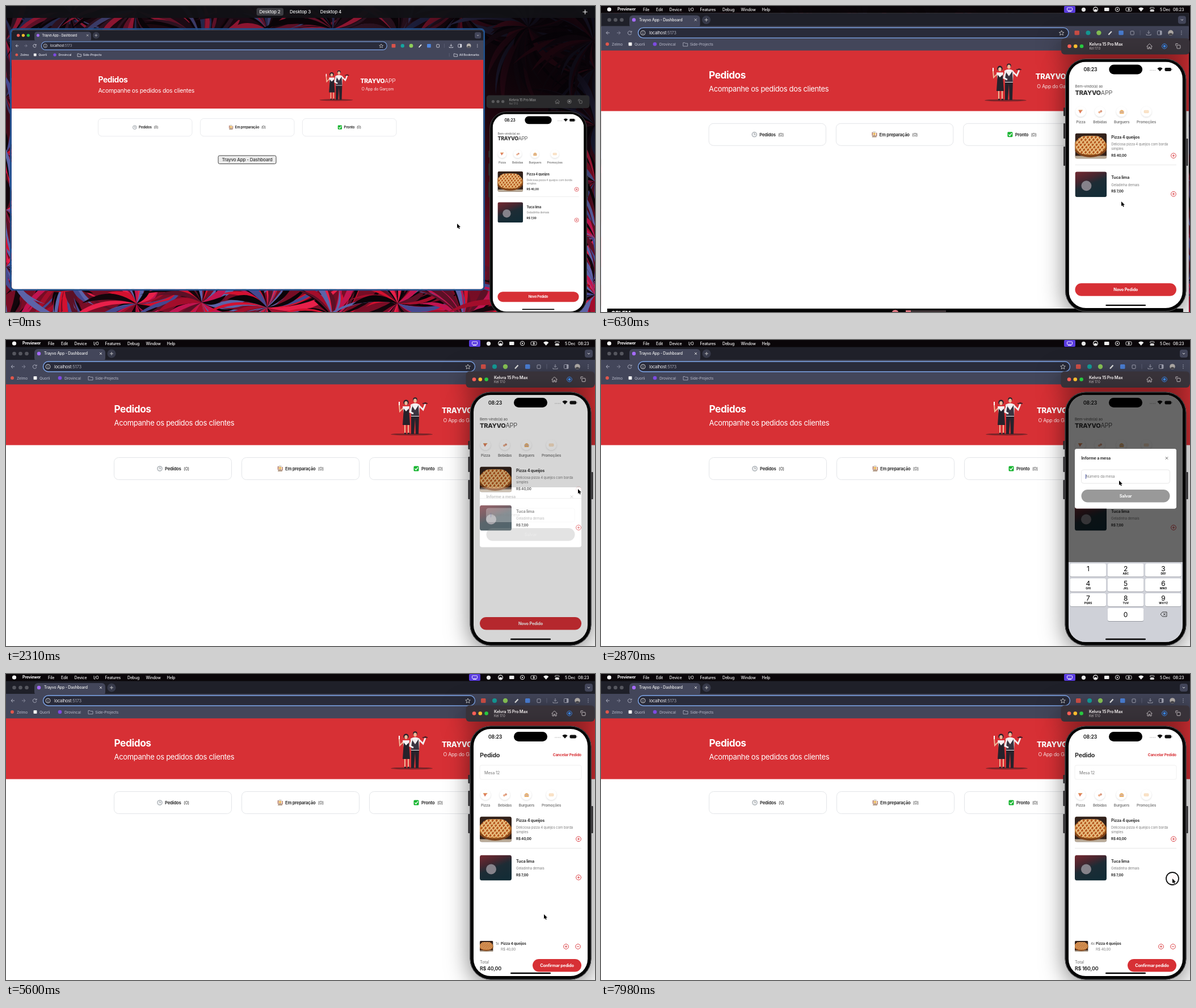
An HTML page with a canvas for the animation above (8000 ms loop, 1038 by 540 pixels).

```html
<!DOCTYPE html>
<html lang="pt-BR">
<head>
<meta charset="utf-8">
<title>Pedidos</title>
<style>
  html, body { margin: 0; width: 100%; height: 100%; overflow: hidden; background: #000; }
  canvas { display: block; width: 100vw; height: 100vh; }
</style>
</head>
<body>
<canvas id="stage"></canvas>
<script>
const W = 1038, H = 540, LOOP = 8000, STEP = 70;
const RED = '#d73035', INK = '#333', GRAY = '#808080';
const FONT = 'Inter, "Noto Sans", sans-serif';
const canvas = document.getElementById('stage');
const dpr = window.devicePixelRatio || 1;
canvas.width = W * dpr;
canvas.height = H * dpr;
let ctx = canvas.getContext('2d');

const clamp = v => Math.max(0, Math.min(1, v));
const easeOut = v => 1 - (1 - clamp(v)) ** 3;
const during = (t, start, length) => t >= start && t < start + length;

// Drawing helpers
function paint(shape, fill, stroke, width = 1) {
  if (fill) { ctx.fillStyle = fill; ctx.fill(shape); }
  if (stroke) { ctx.strokeStyle = stroke; ctx.lineWidth = width; ctx.stroke(shape); }
}
function box(x, y, w, h, r, fill, stroke, width) {
  const shape = new Path2D();
  shape.roundRect(x, y, w, h, r);
  paint(shape, fill, stroke, width);
}
function oval(x, y, rx, ry, fill, stroke, width) {
  const shape = new Path2D();
  shape.ellipse(x, y, rx, ry, 0, 0, 7);
  paint(shape, fill, stroke, width);
}
const dot = (x, y, r, fill, stroke, width) => oval(x, y, r, r, fill, stroke, width);
const line = (d, stroke, width) => paint(new Path2D(d), null, stroke, width);
const solid = (d, fill) => paint(new Path2D(d), fill);

// y is the middle of the capital letters
function text(str, x, y, size, weight = 400, color = INK, align = 'left') {
  ctx.font = `${weight} ${size}px ${FONT}`;
  ctx.letterSpacing = `${-0.025 * size}px`;
  ctx.textAlign = align;
  ctx.fillStyle = color;
  ctx.fillText(str, x, y + size * 0.36);
  return ctx.measureText(str).width;
}
function brand(x, y, size, color) {
  const w = text('TRAYVO', x, y, size, 800, color);
  text('APP', x + w, y, size, 300, color);
}
function inside(x, y, w, h, r, draw) {
  ctx.save();
  ctx.beginPath();
  ctx.roundRect(x, y, w, h, r);
  ctx.clip();
  draw();
  ctx.restore();
}
function faded(alpha, draw) {
  ctx.save();
  ctx.globalAlpha *= alpha;
  draw();
  ctx.restore();
}
function placed(scale, x, y, draw) {
  ctx.save();
  ctx.translate(x, y);
  ctx.scale(scale, scale);
  draw();
  ctx.restore();
}

// Palm-like wallpaper, drawn once
const wallpaper = (() => {
  const layer = document.createElement('canvas');
  layer.width = W;
  layer.height = H;
  const screen = ctx;
  ctx = layer.getContext('2d');
  let seed = 11;
  const rnd = () => (seed = (seed * 16807) % 2147483647) / 2147483647;
  const dim = ['#5c1026', '#8c1530', '#23264a', '#3a3a66', '#0a0408', '#0a0408', '#1b0a14', '#2c1220'];
  const vivid = ['#d3112f', '#e8204a', '#a30d2b', '#c01450', '#45488f', '#5c63a8', '#0a0408', '#14060c', '#5c1026'];
  const ground = ctx.createLinearGradient(0, 0, 0, H);
  ground.addColorStop(0, '#14070e');
  ground.addColorStop(1, '#7c0d26');
  ctx.fillStyle = ground;
  ctx.fillRect(0, 0, W, H);
  function fan(cx, cy, colors, leaves) {
    for (let i = 0; i < leaves; i++) {
      const a = rnd() * 6.28, reach = 40 + rnd() * 110, wide = 3 + rnd() * 9;
      const dx = Math.cos(a), dy = Math.sin(a);
      const bend = reach * 0.25, mx = cx + dx * reach / 2 - dy * bend, my = cy + dy * reach / 2 + dx * bend;
      const x = cx + dx * reach, y = cy + dy * reach;
      solid(`M${cx} ${cy}Q${mx - dy * wide} ${my + dx * wide} ${x} ${y}Q${mx + dy * wide} ${my - dx * wide} ${cx} ${cy}`,
        colors[Math.floor(rnd() * colors.length)]);
    }
  }
  for (let i = 0; i < 10; i++) {
    fan(i * 115, rnd() * 70, dim, 45);
    fan(i * 115, 470 + rnd() * 90, vivid, 55);
    fan(i % 2 * W, 60 + i * 50, i < 4 ? dim : vivid, 40);
  }
  const shade = ctx.createRadialGradient(960, 80, 60, 960, 80, 330);
  shade.addColorStop(0, 'rgba(5,2,6,.85)');
  shade.addColorStop(1, 'rgba(5,2,6,0)');
  ctx.fillStyle = shade;
  ctx.fillRect(0, 0, W, H);
  ctx = screen;
  return layer;
})();

function servers() {
  oval(715, 166.5, 37, 2, '#7d2429');
  line('M703 147V165M709 147V165', '#f0b797', 2);
  line('M702 165h3M708 165h3', '#26222b', 2.5);
  dot(705, 110, 4.6, '#26222b');
  oval(705, 111.5, 2.8, 3.4, '#f0b797');
  line('M701 119L694 126L693 115', '#f0b797', 2);
  line('M693 115V109', '#fff', 2);
  solid('M699 117L711 117L710 130H701Z', '#f4eff0');
  solid('M701 121L705 126L710 121L712 150H699Z', '#26222b');
  solid('M714 132H728L727 166H722L721 138L719 166H714Z', '#26222b');
  solid('M713 114Q721 109 729 114L728 135H714Z', '#f4eff0');
  solid('M715 115L721 124L727 115L728 134H714Z', '#3a3440');
  line('M715 116L712 127L718 130M728 116L735 123L739 113', '#f4eff0', 2.8);
  line('M734 112H743', '#26222b', 1.4);
  solid('M736 111.5a3.5 3.5 0 0 1 6 0z', '#5b1a20');
  dot(721, 105, 3.7, '#26222b');
  oval(721, 107, 2.8, 3.6, '#f0b797');
}

function browser(active) {
  const glyph = active ? '#e4e5ee' : '#a8aaba', bar = '#43465a';
  const lights = active ? ['#ff5f57', '#febc2e', '#28c840'] : Array(3).fill('#55565e');
  box(0, 12, W + 1, 572, active ? 6 : 0, '#fff');
  box(0, 12, W + 1, 24, active ? [6, 6, 0, 0] : 0, '#1f2029');
  lights.forEach((c, i) => dot(14.5 + i * 11, 24, 3.3, c));
  box(50, 16, 125, 22, 6, bar);
  dot(58, 24, 3.2, '#a66bff');
  text('Trayvo App - Dashboard', 67, 23.7, 6.9, 500, '#eee');
  line('M165 22l4 4m0 -4l-4 4', '#ddd', 0.9);
  dot(186, 24, 7.5, '#373a4a');
  line('M183 24h6m-3 -3v6', '#ccc', 0.9);
  box(1020, 17, 14, 14, 4, bar);
  line('M1025 23l2 2l2 -2', '#ddd', 1);

  ctx.fillStyle = bar;
  ctx.fillRect(0, 35, W + 1, 44);
  line('M15 47H9l3 -3m-3 3l3 3', glyph, 1);
  line('M28 47h6l-3 -3m3 3l-3 3', '#85879a', 1);
  line('M53.5 45.5a3.3 3.3 0 1 0 .3 2.5M54 43.5v2.4h-2.4', glyph, 1);
  box(65.5, 38, 761, 18, 9, '#292b3a', '#80a9ee', 1.4);
  dot(74, 47, 4, null, '#ddd', 0.9);
  line('M74 46.5v3M74 44.5v1', '#ddd', 0.9);
  const hostWidth = text('localhost', 85, 47, 7.5, 400, '#f2f2f6');
  text(':5173', 85 + hostWidth, 47, 7.5, 400, '#a5a7b5');
  line('M814 43l1.3 2.8l3 .3l-2.3 2l.8 3l-2.8 -1.6l-2.8 1.6l.8 -3l-2.3 -2l3 -.3z', '#ddd', 0.8);
  box(837, 43, 8.5, 8, 1.5, '#d9534a');
  dot(861, 47, 4, '#15a5a0');
  dot(880, 47, 4.2, '#8fcf5a');
  line('M897 50.5l5.5 -6', '#eee', 2.2);
  box(915, 43, 8.5, 8, 1.5, '#4f86e0');
  box(936, 44, 6, 6.5, 1, null, glyph, 1);
  line('M953 42.5v9', '#62657a', 1);
  line('M968 43v5m-2.3 -2l2.3 2.3l2.3 -2.3M964 49v2h8v-2', glyph, 1);
  box(983.5, 43.5, 7.5, 7, 1, null, glyph, 1);
  solid('M988 43.5h3v7h-3z', glyph);
  dot(1007, 47, 4.8, '#b9b4b0');
  solid('M1003 50q4 -5 8 0q-4 3 -8 0', '#4b4a50');
  [44, 47, 50].forEach(y => dot(1026, y, 0.8, glyph));

  dot(11, 67, 3, '#e0574c');
  text('Zelmo', 19, 67.2, 6.7, 500, glyph);
  box(48.5, 64, 6, 6, 1, '#f0f0f0');
  text('Quorli', 59, 67.2, 6.7, 500, glyph);
  dot(95, 67, 3.3, '#7d4be0');
  text('Drovincal', 103, 67.2, 6.7, 500, glyph);
  const folder = x => line(`M${x} 64.5h3l1 1.2h4v5h-8z`, glyph, 0.9);
  folder(145);
  text('Side-Projects', 157, 67.2, 6.7, 500, glyph);
  line('M964 63v8', '#62657a', 1);
  folder(974);
  text('All Bookmarks', 986, 67.2, 6.7, 500, glyph);

  ctx.fillStyle = RED;
  ctx.fillRect(0, 78.3, W + 1, 107.2);
  text('Pedidos', 190.5, 122, 17.3, 700, '#fff');
  text('Acompanhe os pedidos dos clientes', 190.5, 146, 13, 400, '#fff');
  servers();
  brand(768, 124.5, 13, '#fff');
  text('O App do Garçom', 770.5, 142, 8.8, 400, '#fbe5e5');

  const columns = [['Pedidos', 190.5, 89.5], ['Em preparação', 415.5, 76.5], ['Pronto', 640.5, 91.5]];
  for (const [label, x, inset] of columns) {
    box(x, 207.5, 207, 39, 8, '#fff', '#dcdfe3', 0.8);
    const w = text(label, x + inset, 227, 7.6, 700, INK);
    text('(0)', x + inset + w + 4.5, 227, 7.7, 400, INK);
  }
  dot(271, 227, 4.2, '#eef0f2', '#a3a9ae', 1.2);
  line('M271 224.5V227H273', '#777', 0.7);
  solid('M480 222q3 -1.5 6 0l-.6 3h-5z', '#d9d6d3');
  dot(483, 226, 2.3, '#f0bd62');
  solid('M479 232q0 -4 4 -4t4 4z', '#b79f8c');
  line('M479.5 223v6M487 224v6', '#a2553d', 1.2);
  box(718.5, 222.5, 9, 9, 1.5, '#18b531');
  line('M720.5 227l2 2.2l3.5 -4.5', '#fff', 1.4);
}

// Photos are 56 by 45 at full size
function pizzaPhoto(x, y, scale = 1) {
  placed(scale, x, y, () => inside(0, 0, 56, 45, 4, () => {
    ctx.fillStyle = '#33221b';
    ctx.fillRect(0, 0, 56, 45);
    ctx.fillStyle = '#b9aa97';
    ctx.fillRect(0, 40, 56, 5);
    oval(27, 24, 30, 18.5, '#7f4218');
    oval(27, 21.5, 28, 17, '#c07a30');
    inside(1, 5, 52, 32, 16, () => {
      ctx.fillStyle = '#b5561d';
      ctx.fillRect(0, 0, 56, 45);
      for (let i = -7; i <= 7; i++) {
        const cx = 27 + i * 7;
        line(`M${cx - 16} 38L${cx + 16} 4M${cx - 10} 4L${cx + 12} 38`, '#e9bf80', 2);
      }
    });
  }));
}
function sodaPhoto(x, y) {
  inside(x, y, 56, 45, 4, () => {
    const tone = ctx.createLinearGradient(x + 12, y, x + 30, y + 45);
    tone.addColorStop(0, '#6a2830');
    tone.addColorStop(0.3, '#47262f');
    tone.addColorStop(0.55, '#1d2c35');
    tone.addColorStop(1, '#142c36');
    ctx.fillStyle = tone;
    ctx.fillRect(x, y, 56, 45);
    dot(x + 20, y + 25, 9, '#85828a');
  });
}
function round(x, y, sign, alpha = 1) {
  faded(alpha, () => {
    dot(x, y, 4.4, null, RED, 0.9);
    line(`M${x - 2.2} ${y}h4.4` + (sign === '+' ? `M${x} ${y - 2.2}v4.4` : ''), RED, 0.9);
  });
}
function pill(label, x, y, w, h, fill) {
  box(x, y, w, h, h / 2, fill);
  text(label, x + w / 2, y + h / 2, 7.3, 700, '#fff', 'center');
}

function categoryIcons(y) {
  solid(`M841 ${182.5 + y}l7 0l-4 6z`, '#d9633f');
  box(841, 182 + y, 7.5, 1.5, 0.7, '#e0a060');
  dot(878, 186.3 + y, 2, '#e9a27a');
  dot(881, 184.5 + y, 2, '#d58a6c');
  solid(`M913.5 ${184.8 + y}q4 -5.5 8 0z`, '#e6a14b');
  box(913.5, 185.2 + y, 8, 1.3, 0, '#b06a40');
  box(913.5, 187 + y, 8, 2, 1, '#e6a14b');
  box(957, 183 + y, 8, 4.5, 1, '#f9dfc0', '#f3cda0', 0.6);
}

function menu(shift, t) {
  const y = shift;
  ctx.save();
  ctx.shadowColor = 'rgba(0,0,0,.13)';
  ctx.shadowBlur = 3 * dpr;
  ctx.shadowOffsetY = 1.3 * dpr;
  [845, 879, 917, 961].forEach(x => dot(x, 185 + y, 9.2, '#fff'));
  ctx.restore();
  faded(0.85, () => categoryIcons(y));
  [['Pizza', 845], ['Bebidas', 879], ['Burguers', 917.5], ['Promoções', 961]]
    .forEach(([label, x]) => text(label, x, 203.5 + y, 6.5, 600, '#757575', 'center'));

  const top = 223.5 + y, second = top + 68;
  pizzaPhoto(835, top);
  text('Pizza 4 queijos', 899, top + 6.7, 7.2, 700);
  text('Deliciosa pizza 4 queijos com borda', 899, top + 19, 6.2, 400, GRAY);
  text('simples', 899, top + 27, 6.2, 400, GRAY);
  text('R$ 40,00', 899, top + 39.5, 6.2, 700);
  round(1009, top + 39.7, '+', during(t, 1960, 420) ? 0.2 : 1);
  line(`M835 ${top + 56}H1014`, '#e3e3e3', 0.8);
  sodaPhoto(835, second);
  text('Tuca lima', 899, second + 10.5, 7.2, 700);
  text('Geladinha demais', 899, second + 23, 6.2, 400, GRAY);
  text('R$ 7,00', 899, second + 35, 6.2, 700);
  round(1009, second + 39.5, '+', t >= 7910 ? 0.1 : 1);
}

const cartClicks = [6510, 6790, 7070];

function orderScreen(t) {
  const quantity = 1 + cartClicks.filter(c => t >= c + STEP).length;
  text('Pedido', 835, 143, 10.9, 700);
  text('Cancelar Pedido', 1014, 143, 6.6, 700, RED, 'right');
  box(835, 161, 179, 25, 3, '#fff', '#ececec', 0.8);
  text('Mesa 12', 843, 174, 7.3, 400, '#777');
  menu(28, t);
  pizzaPhoto(835, 471, 0.42);
  text(`${quantity}x`, 863, 476, 6.2, 400, '#666');
  text('Pizza 4 queijos', 872, 476, 6.4, 700);
  text('R$ 40,00', 872, 486, 6.3, 400, GRAY);
  round(987, 481, '+', cartClicks.some(c => during(t, c, 140)) ? 0.2 : 1);
  round(1008, 481, '-');
  text('Total', 835, 508.5, 7.3, 400, '#777');
  text(`R$ ${quantity * 40},00`, 835, 519.5, 8.8, 700);
  pill('Confirmar pedido', 928, 503, 86, 22.5, RED);
}

function homeScreen(t) {
  text('Bem-vindo(a) ao', 835, 140, 6.5, 400, '#555');
  brand(835, 151.5, 11, INK);
  menu(0, t);
  pill('Novo Pedido', 835, 489, 179, 22.5, RED);
}

function modal(t, alpha, lift) {
  const y = 260 - 68 * lift, typed = t >= 4200 ? '12' : t >= 3570 ? '1' : '';
  faded(alpha, () => {
    const shade = new Path2D();
    shade.rect(820, 90, 210, 450);
    shade.roundRect(835, y, 179, 105.5, 4);
    ctx.fillStyle = 'rgba(0,0,0,.6)';
    ctx.fill(shade, 'evenodd');
    box(835, y, 179, 105.5, 4, '#fff');
    text('Informe a mesa', 846.5, y + 16.5, 7.2, 700);
    line(`M994.8 ${y + 14.3}l4.4 4.4m0 -4.4l-4.4 4.4`, '#555', 0.9);
    box(846.5, y + 37, 156, 24, 4, '#fff', '#e0e0e0', 0.8);
    const w = typed ? text(typed, 854.5, y + 49, 6.6) : 0;
    if (!typed) text('Número da mesa', 854.5, y + 49, 6.6, 400, GRAY);
    line(`M${854.5 + w} ${y + 45}v8`, '#3c4aa0', 0.9);
    pill('Salvar', 846.5, y + 72, 156, 22.5, typed ? RED : '#999');
  });
}

function keyboard(t, lift) {
  const top = 392 + 145 * (1 - lift);
  const letters = ['', 'ABC', 'DEF', 'GHI', 'JKL', 'MNO', 'PQRS', 'TUV', 'WXYZ'];
  ctx.fillStyle = '#cfd1d8';
  ctx.fillRect(820, top, 210, 150);
  for (let i = 0; i < 10; i++) {
    const column = i < 9 ? i % 3 : 1, row = Math.floor(i / 3);
    const x = 826.5 + column * 66.3, y = top + 2.5 + row * 26.2;
    const pressed = i === 0 && during(t, 3500, 140) || i === 1 && during(t, 4130, 140);
    box(x, y + 0.8, 63.5, 23, 3, '#95989f');
    box(x, y, 63.5, 23, 3, pressed ? '#b9bcc4' : '#fff');
    text((i + 1) % 10, x + 31.7, y + (i < 9 ? 8.7 : 11.5), 12, 400, '#000', 'center');
    if (i < 9) text(letters[i].split('').join('\u200a'), x + 32, y + 17.8, 4.8, 700, '#000', 'center');
  }
  const y = top + 92;
  line(`M986 ${y}l3.5 -4h7.5v8h-7.5zM991 ${y - 1.8}l3.6 3.6m0 -3.6l-3.6 3.6`, '#222', 0.9);
}

function phone(t, active) {
  ctx.save();
  if (active) {
    ctx.shadowColor = 'rgba(0,0,0,.5)';
    ctx.shadowBlur = 42 * dpr;
    ctx.shadowOffsetY = 8 * dpr;
  }
  box(810.5, 55.5, 227, 28.5, 6, active ? '#39333a' : '#2a2a2c');
  box(817.5, 91.5, 214, 448, 37, '#000');
  ctx.restore();
  const lights = active ? ['#ff5f57', '#febc2e', '#28c840'] : Array(3).fill('#5a5a5c');
  lights.forEach((c, i) => dot(825 + i * 10.8, 69.5, 3.3, c));
  text('Kelvra 15 Pro Max', 860, 66, 7.3, 600, active ? '#f4f0f0' : '#858585');
  text('Kel 17.0', 860, 73.7, 6, 400, active ? '#b5aeb0' : '#777');
  const icon = active ? '#c9c3c6' : '#858585';
  line('M961.5 70l5 -5l5 5M963 69v5h2.5v-3h2v3h2.5v-5', icon, 0.9);
  dot(993, 69.5, 4.3, null, active ? '#3784e8' : icon, 1);
  dot(993, 69.5, 2.2, active ? '#3784e8' : icon);
  box(1015, 67.5, 6, 6, 1, null, icon, 0.9);
  line('M1013 69v-4h4', icon, 0.9);

  [[178, 15], [206, 27], [247, 34]].forEach(([y, h]) => box(814.5, y, 3, h, 1, '#29282a'));
  box(1031.5, 233, 3, 48, 1, '#29282a');
  box(818, 92, 213, 447, 36.5, '#050505', '#68686b', 0.9);

  inside(824, 97, 201, 436, 30, () => {
    ctx.fillStyle = '#fff';
    ctx.fillRect(824, 97, 201, 436);
    if (t >= 5110) orderScreen(t); else homeScreen(t);
    text('08:23', 862, 110.7, 8.7, 600, '#111', 'center');
    for (let i = 0; i < 4; i++) dot(968 + i * 2.8, 112, 0.7, '#aaa');
    solid('M980.3 108.8q4.7 -4 9.4 0l-4.7 5z', '#111');
    box(993.5, 107.5, 11.5, 6, 2, '#111');
    box(1005.6, 109.3, 1, 2.4, 0.5, '#777');

    const opening = t < 4000;
    const alpha = clamp(opening ? (t - 2240) / 260 : 1 - (t - 5040) / 260);
    const lift = opening ? easeOut((t - 2310) / 210) : 1 - easeOut((t - 5040) / 280);
    if (alpha > 0) modal(t, alpha, lift);
    if (lift > 0) keyboard(t, lift);
    box(889, 526.8, 71, 2.4, 1.2, '#000');
  });
  box(895, 102, 59, 17, 8.5, '#000');
}

function menuBar() {
  ctx.fillStyle = '#0a0609';
  ctx.fillRect(0, 0, W, 12.5);
  dot(14.5, 6, 3.6, '#fff');
  text('Previewer', 29, 6, 6.9, 700, '#fff');
  const items = [['File', 74], ['Edit', 97], ['Device', 120.5], ['I/O', 154], ['Features', 174.5],
    ['Debug', 214], ['Window', 246.5], ['Help', 283.5]];
  items.forEach(([label, x]) => text(label, x, 6, 7, 500, '#f5f5f5'));
  box(816, 0, 20, 12, 2, '#5a3ce0');
  box(821.5, 3, 9, 5, 1, null, '#fff', 0.9);
  line('M823 9.5h6', '#fff', 0.9);
  dot(850.5, 6.3, 3.6, '#e6e6e6');
  dot(871.5, 6, 3.9, null, '#eee', 1.2);
  solid('M868.5 7q3 -3 6 0l-1 2h-4z', '#eee');
  box(887, 3, 8.5, 6, 1, '#eee');
  dot(910, 6, 3.7, null, '#eee', 1);
  solid('M909 4.2v3.6l2.7 -1.8z', '#eee');
  box(925, 3, 10, 6, 1.5, null, '#eee', 0.9);
  solid('M931 2.5l-3 4h2l-1 3.2l3.5 -4.2h-2z', '#eee');
  solid('M947 4.5q4.7 -3.8 9.4 0l-4.7 5.2z', '#eee');
  box(967.5, 2.5, 7.5, 3, 1.5, null, '#eee', 0.8);
  box(967.5, 6.8, 7.5, 3, 1.5, '#eee');
  text('5 Dec', 985, 6, 7, 500, '#f5f5f5');
  text('08:23', 1008, 6, 7.2, 500, '#f5f5f5');
}

function spacesBar() {
  ctx.fillStyle = 'rgba(17,17,21,.96)';
  ctx.fillRect(0, 0, W, 21);
  box(441.5, 3.5, 47.5, 13.5, 3.5, '#3d3d42');
  [465, 518.5, 572.5].forEach((x, i) => text(`Desktop ${i + 2}`, x, 10.5, 8, 500, '#eee', 'center'));
  line('M1016.5 10.5h8m-4 -4v8', '#eee', 1.2);
}

// Pointer path: time, x, y
const path = [
  [70, 795, 384], [420, 890, 362], [630, 917, 345], [840, 917, 294], [980, 917, 292], [1260, 930, 254],
  [1330, 930, 254], [1400, 1028, 236], [1610, 1016, 270], [1820, 1008, 263], [2310, 1008, 263],
  [2520, 913, 248], [3080, 913, 248], [3500, 858, 406], [3920, 862, 418], [4060, 916, 405],
  [4340, 922, 404], [4690, 918, 278], [5040, 918, 278], [5600, 948, 424], [5740, 948, 453],
  [6230, 987, 481], [7280, 988, 482], [7350, 993, 388], [7630, 1003, 362], [7770, 1007, 361]
];
const clicks = [1960, 3500, 4130, 4900, ...cartClicks, 7910];

function pointer(t) {
  let i = path.findIndex(point => point[0] > t);
  if (i < 0) i = path.length;
  const a = path[Math.max(0, i - 1)], b = path[Math.min(i, path.length - 1)];
  const k = b[0] > a[0] ? clamp((t - a[0]) / (b[0] - a[0])) : 0;
  const x = a[1] + (b[1] - a[1]) * k, y = a[2] + (b[2] - a[2]) * k;
  if (clicks.some(c => during(t, c, 140))) dot(x, y, 11, null, '#111', 1.8);
  const arrow = new Path2D(`M${x} ${y}v8.2l1.9 -1.7l1.3 2.9l1.5 -.7l-1.3 -2.8h2.6z`);
  paint(arrow, null, '#fff', 1.4);
  paint(arrow, '#000');
}

function draw(t) {
  ctx.setTransform(dpr, 0, 0, dpr, 0, 0);
  const rest = 1 - easeOut(t / 840), scale = 1 - 0.2 * rest, switched = t >= 280;
  if (rest > 0) ctx.drawImage(wallpaper, 0, 0, W, H);
  placed(scale, 10 * rest, 32.6 * rest, () => browser(!switched));
  if (t < STEP) {
    box(8.3, 40.5, 834.4, 460.5, 6, null, '#20528f', 2.6);
    box(374, 264, 102, 14.5, 2.5, '#ececec', '#444', 1);
    text('Trayvo App - Dashboard', 425, 271.2, 8, 500, '#333', 'center');
  }
  if (during(t, 560, 210)) {
    ctx.fillStyle = '#000';
    ctx.fillRect(11, 534, 1015, 6);
    text('ORLEM', 18, 542, 10, 800, '#fff');
    dot(518.5, 542, 6, '#d9737d');
    box(537, 537, 71, 4, 0, '#3a3033');
    box(537, 537, 9, 4, 0, '#d9737d');
  }
  placed(scale, 198.4 * rest, 113 * rest, () => phone(t, switched));
  if (rest > 0) placed(1, 0, -21 * (1 - rest), spacesBar);
  faded(1 - rest, menuBar);
  pointer(t);
}

function frame() {
  draw(Math.floor(performance.now() % LOOP / STEP) * STEP);
  requestAnimationFrame(frame);
}
frame();
</script>
</body>
</html>
```
